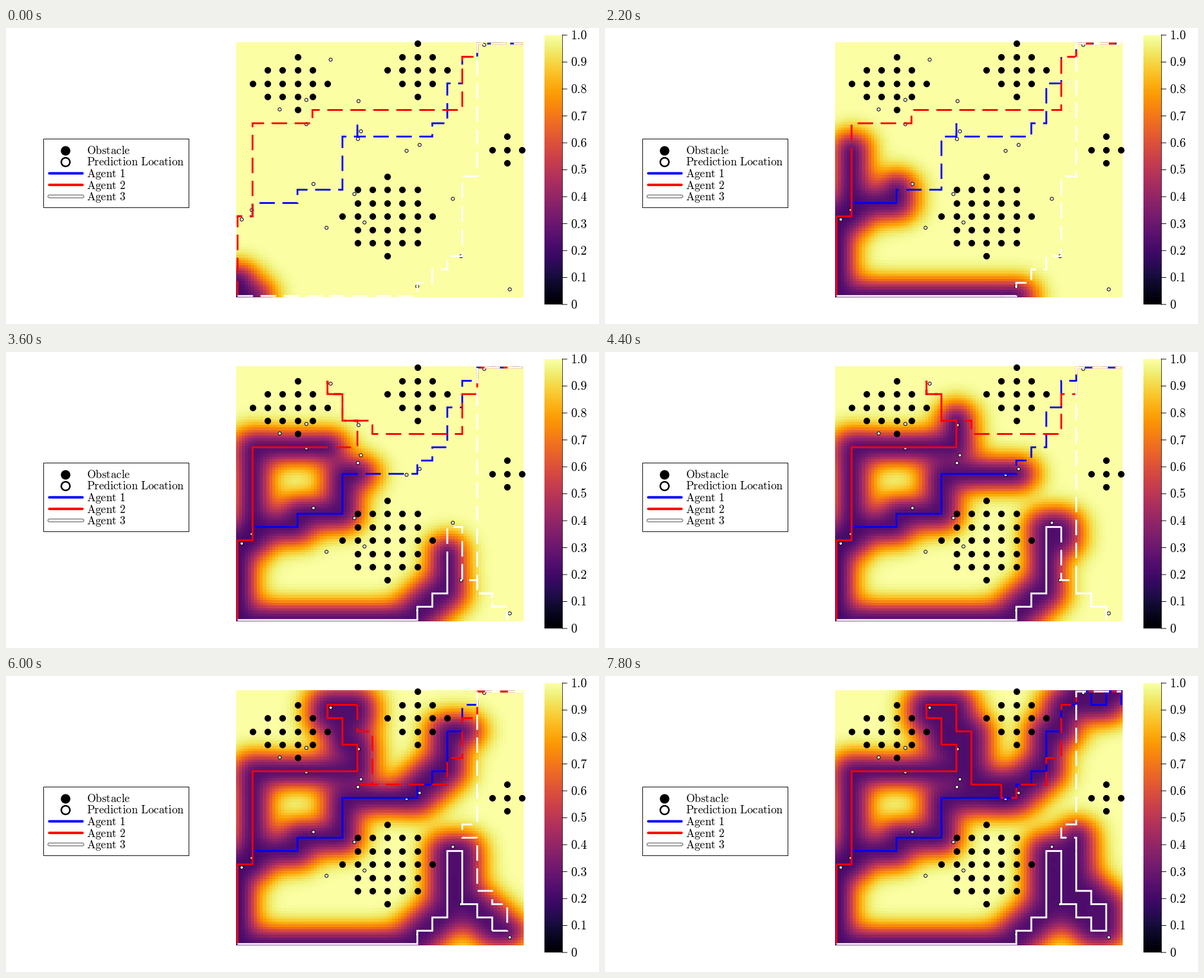
These frames come from a looping animation (1000x500 px, 8 s). A matplotlib script:

```python
import numpy as np
import matplotlib
import matplotlib.pyplot as plt
from matplotlib.animation import FuncAnimation
from matplotlib.patches import Rectangle

matplotlib.rcParams["mathtext.fontset"] = "cm"
matplotlib.rcParams["path.simplify"] = False
matplotlib.rcParams["path.snap"] = False

FRAMES, INTERVAL = 40, 200
PT = 0.72  # points per pixel at 100 dpi
LEFT, RIGHT, TOP, BOTTOM = 388, 873, 24, 455
CELLS = 96  # five cells per grid step, centred on 0, 0.2 ... 19
LENGTH2, NOISE = 1.8, 0.2  # squared kernel length and sensor noise
MOVES = {"U": (0, 1), "D": (0, -1), "L": (-1, 0), "R": (1, 0)}


def px(i):
    return LEFT + (5 * np.asarray(i) + 0.5) * (RIGHT - LEFT) / CELLS


def py(j):
    return BOTTOM - (5 * np.asarray(j) + 0.5) * (BOTTOM - TOP) / CELLS


def walk(moves, start=(0, 0)):
    """Unit steps for moves such as 'U6 R D2'."""
    steps = [start]
    for move in moves.split():
        dx, dy = MOVES[move[0]]
        for _ in range(int(move[1:] or 1)):
            steps.append((steps[-1][0] + dx, steps[-1][1] + dy))
    return steps


class Agent:
    """Travels a route; each plan is (first frame, branching step, moves to goal)."""

    def __init__(self, color, route, *plans):
        self.color, self.route, self.plans = color, walk(route), plans

    def ahead(self, n):
        _, branch, moves = [p for p in self.plans if p[0] <= n][-1]
        return self.route[n:branch] + walk(moves, self.route[branch])


AGENTS = [
    Agent("#0000ff",
          "U6 R U R3 U R3 U3 R5 U R U R U3 R U2 R U R D R U R",
          (0, 18, "U R U D R5 U R U3 R U2 R U R3"),
          (17, 36, "R2"),
          (37, 40, "D U")),
    Agent("#ff0000",
          "U6 R U7 R7 U2 L U2 L U R2 D2 R D4 R2 D",
          (0, 18, "U R10 U4 R U R3"),
          (17, 28, "D R D2 R2 D R6 U3 R U2 R3"),
          (25, 28, "U D R2 D2 R D2 R6 U3 R U2 R3"),
          (29, 37, "L R6 U2 R U3 R U2 R3"),
          (37, 40, "R U R2 U2 R U4 R U R3")),
    Agent("#ffffff",
          "R12 U R U R U5 R D4 R D R D R U2 L U L U4",
          (0, 16, "U R U6 R U10 R3"),
          (12, 16, "U R U4 L U R U R U10 R3"),
          (17, 31, "D U L U L U17 R3"),
          (25, 31, "D U L U3 L U15 R3"),
          (29, 40, "L U R U10 R3")),
]

# Discs of obstacles as (x, y, radius)
DISCS = [(4, 16, 2), (2, 16, 1), (12, 17, 2), (10, 6, 3), (18, 11, 1)]
PREDICTIONS = [
    (547, 52.5), (506, 120.5), (461, 137), (594, 122.5), (506, 162), (598, 173.5),
    (592.5, 187), (675, 206.5), (697, 196.5), (518, 263), (587, 279.5), (414, 306.5),
    (397, 323), (539.5, 337), (604, 328), (752.5, 287.5), (767, 384.5), (693, 436),
    (849, 440.5), (806, 28),
]

GX, GY = np.meshgrid(np.arange(CELLS) / 5, np.arange(CELLS) / 5)
GRID = np.column_stack([GX.ravel(), GY.ravel()])


def kernel(a, b):
    d2 = ((a[:, None, :] - b[None, :, :]) ** 2).sum(axis=2)
    return np.exp(-d2 / (2 * LENGTH2))


def uncertainty(n):
    """Gaussian process variance with sensor noise, scaled to a maximum of 1."""
    seen = np.array([p for a in AGENTS for p in a.route[:n + 2]], float)
    points, counts = np.unique(seen, axis=0, return_counts=True)
    cov = kernel(points, points) + np.diag(NOISE / counts)
    half = np.linalg.solve(np.linalg.cholesky(cov), kernel(points, GRID))
    variance = 1 - (half ** 2).sum(axis=0)
    return ((variance + NOISE) / (1 + NOISE)).reshape(GX.shape)


def to_pixels(points):
    x, y = np.array(points, float).T
    return px(x), py(y)


fig = plt.figure(figsize=(10, 5), dpi=100, facecolor="white")
ax = fig.add_axes([0, 0, 1, 1])
ax.axis("off")


def shade(values, extent):
    return ax.imshow(values, cmap="inferno", vmin=0, vmax=1, origin="lower",
                     interpolation="nearest", aspect="auto", extent=extent, zorder=1)


def dots(x, y, size, face, edge, z):
    ax.plot(x, y, "o", ms=size * PT, mfc=face, mec="black", mew=edge * PT, zorder=z)


def bar(y, color, width, z=6):
    ax.plot([73, 129], [y, y], color=color, lw=width * PT,
            solid_capstyle="round", zorder=z)


def label(x, y, text, size):
    ax.text(x, y, "$\\mathrm{%s}$" % text.replace(" ", "\\ "),
            fontsize=size * PT, va="baseline", ha="left", zorder=6)


heat = shade(uncertainty(0), (LEFT, RIGHT, BOTTOM, TOP))

# Colour bar
shade(np.linspace(0, 1, 256)[:, None], (908, 938, 467, 12))
ax.plot([938.5, 938.5], [12, 467], color="black", lw=0.8 * PT, zorder=2)
for k in range(11):
    y = 467 - 45.5 * k
    ax.plot([938, 946], [y, y], color="black", lw=1 * PT, zorder=2)
    label(951.5, y + 7, "%.1f" % (k / 10) if k else "0", 21)

# Legend
ax.add_patch(Rectangle((63.5, 187.5), 245, 116, fc="white", ec="black",
                       lw=1 * PT, zorder=5))
names = ["Obstacle", "Prediction Location", "Agent 1", "Agent 2", "Agent 3"]
rows = 206.5 + 19.5 * np.arange(len(names))
for name, y in zip(names, rows):
    label(136, y + 6.5, name, 19)
dots(100, rows[0], 15, "black", 1, 6)
dots(100, rows[1], 14.5, "white", 2.6, 6)
bar(rows[2], "#0000ff", 4.2)
bar(rows[3], "#ff0000", 4.2)
bar(rows[4], "#808080", 6.2)
bar(rows[4], "white", 3.2, 7)

# Map markers
blocked = {(x, y) for x in range(20) for y in range(20) for cx, cy, r in DISCS
           if (x - cx) ** 2 + (y - cy) ** 2 <= r * r}
dots(*to_pixels(sorted(blocked)), 10, "black", 1, 2)
dots(*zip(*PREDICTIONS), 5.4, "white", 1.1, 2)

lines = []
for k, agent in enumerate(AGENTS):
    style = dict(color=agent.color, lw=3 * PT, zorder=3 + 0.1 * k)
    done, = ax.plot([], [], solid_capstyle="butt", solid_joinstyle="miter", **style)
    dashed, = ax.plot([], [], linestyle=(0, (26 / 3, 12.8 / 3)),
                      dash_capstyle="butt", dash_joinstyle="miter", **style)
    lines.append((done, dashed))

ax.set_xlim(0, 1000)
ax.set_ylim(500, 0)


def draw(n):
    heat.set_data(uncertainty(n))
    for agent, (done, dashed) in zip(AGENTS, lines):
        done.set_data(*to_pixels(agent.route[:n + 1]))
        dashed.set_data(*to_pixels(agent.ahead(n)))
    return [heat] + [line for pair in lines for line in pair]


anim = FuncAnimation(fig, draw, frames=FRAMES, interval=INTERVAL,
                     repeat=True, repeat_delay=0, blit=False)
plt.show()
```
